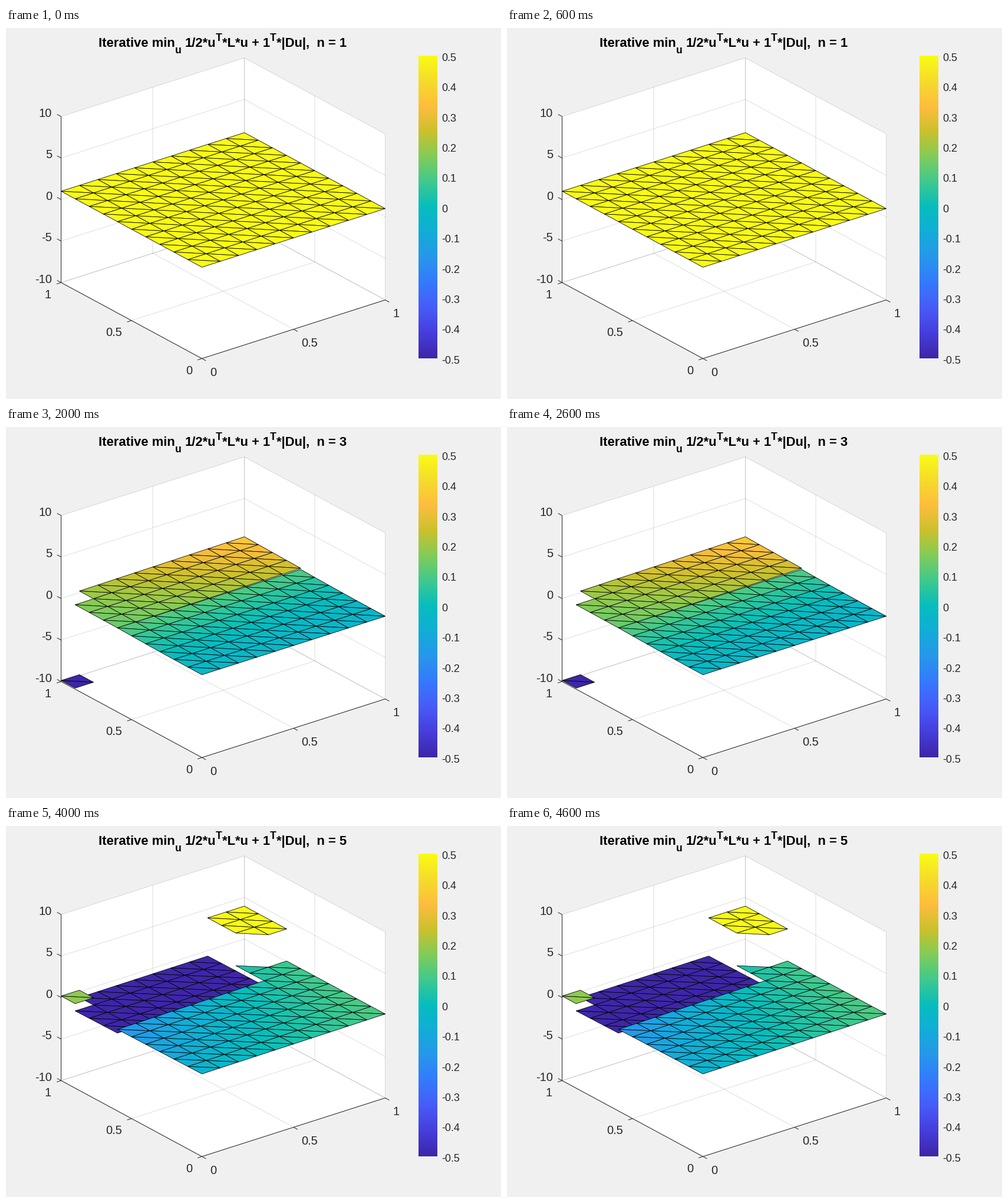
Animation, 840 px wide and 630 px high, one loop 5000 ms. Source, as a matplotlib script:

```python
import numpy as np
import matplotlib.pyplot as plt
from matplotlib.animation import FuncAnimation
from matplotlib.collections import PolyCollection
from matplotlib.colors import LinearSegmentedColormap
from matplotlib.textpath import TextPath

W, H, DPI = 840, 630, 100
PX = 72 / DPI
FONT = "Liberation Sans"
INK = "#262626"
N = 10
SPLIT = 0.6

plt.rcParams["font.family"] = FONT
fig = plt.figure(figsize=(W / DPI, H / DPI), dpi=DPI, facecolor="#f0f0f0")
ax = fig.add_axes([0, 0, 1, 1])
ax.axis("off")

# Evenly spaced key colours from violet through teal and orange to yellow
CMAP = LinearSegmentedColormap.from_list("sheet", (
    "#3e26a8 #463edd #475cf9 #347afd #2797eb #12add8 #06bdbd "
    "#3ec98f #81cc59 #cac12c #fdbd3d #f6db2b #f9fb15").split(), N=512)

# Orthographic projection: pixel vectors of the three box axes
ORIGIN = np.array([332.5, 561.3])
EX = np.array([311, -99.5])
EY = np.array([-239, -129])
EZ = np.array([0, -14.1])


def project(x, y, z=-10):
    x, y, z = (np.asarray(v, float)[..., None] for v in (x, y, z))
    return ORIGIN + x * EX + y * EY + (z + 10) * EZ


def line(a, b, alpha=1.0, zorder=3):
    ax.plot(*zip(a, b), color=INK, alpha=alpha, lw=PX, zorder=zorder,
            solid_capstyle="butt", snap=False)


def grid(a, b):
    line(project(*a), project(*b), alpha=0.15, zorder=2)


def label(x, y, s, size=20, ha="center"):
    """Text whose digits are centred vertically on y."""
    ax.text(x, y + 0.358 * size, s, size=size * PX, ha=ha, va="baseline",
            color=INK)


def draw_box():
    walls = [[(0, 0, -10), (1, 0, -10), (1, 1, -10), (0, 1, -10)],
             [(0, 1, -10), (1, 1, -10), (1, 1, 10), (0, 1, 10)],
             [(1, 1, -10), (1, 0, -10), (1, 0, 10), (1, 1, 10)]]
    for wall in walls:
        ax.fill(*project(*np.transpose(wall)).T, color="white", lw=0, zorder=1)

    line(project(0, 0), project(1, 0))
    line(project(0, 0), project(0, 1))
    line(project(0, 1), project(0, 1, 10))
    tick_x, tick_y = -EX / 42, -EY / 35

    for t in (0, 0.5, 1):
        grid((t, 0, -10), (t, 1, -10))
        grid((0, t, -10), (1, t, -10))
        grid((t, 1, -10), (t, 1, 10))
        grid((1, t, -10), (1, t, 10))
        p, q = project(t, 0), project(0, t)
        line(p, p + tick_y)
        line(q, q + tick_x)
        s = f"{t:g}"
        wide = 4 * (len(s) - 1)
        label(p[0] + 19 + wide, p[1] + 22.5, s)
        label(q[0] - 22 - wide, q[1] + 19.5, s)

    for z in range(-10, 11, 5):
        grid((0, 1, z), (1, 1, z))
        grid((1, 0, z), (1, 1, z))
        p = project(0, 1, z)
        line(p, p - tick_y)
        label(78, p[1] - 6.5, str(z), ha="right")


def draw_colorbar():
    left, right, top, bottom = 700, 732, 47, 561
    ax.imshow(np.linspace(1, 0, bottom - top)[:, None], cmap=CMAP,
              extent=(left, right, bottom, top), aspect="auto",
              interpolation="nearest", zorder=2)
    for k in range(11):
        y = top + (bottom - top) * k / 10
        label(right + 7.5, y + 2.3, f"{(5 - k) / 10:g}", size=18, ha="left")


def advance(s, size):
    """Pen advance of bold text, spaces included."""
    def end(t):
        path = TextPath((0, 0), t, size=size,
                        prop={"family": FONT, "weight": "bold"})
        return path.get_extents().x1
    return end(s + "|") - end("|")


def draw_title():
    """Lay out runs, with _ and ^ marking a lowered or raised run."""
    x, base, full = 157, 32, 22
    runs = ["Iterative min", "_u", " 1/2*u", "^T", "*L*u + 1", "^T", "*"]
    for run in runs:
        shift = {"_": 11, "^": -10}.get(run[0], 0)
        size = full * (0.8 if shift else 1)
        s = run[1:] if shift else run
        body = s.lstrip()
        pad = advance(" ", size) * (len(s) - len(body))
        last = ax.text(x + pad, base + shift, body, size=size * PX,
                       weight="bold", color="black", va="baseline")
        x += advance(s, size)
    return last


def build_mesh():
    tris = []
    for i in range(N):
        for j in range(N):
            a, b, c, d = (i, j), (i + 1, j), (i, j + 1), (i + 1, j + 1)
            tris += [(a, b, c), (b, d, c)]
    tris = np.array(tris) / N
    depth = tris.mean(1) @ [0.61, 0.79]
    return tris[np.argsort(-depth, kind="stable")]


TRIS = build_mesh()
X, Y = TRIS[..., 0], TRIS[..., 1]
CX, CY = X.mean(1)[:, None], Y.mean(1)[:, None]
FRONT_V, BACK_V = Y / SPLIT, (Y - SPLIT) / (1 - SPLIT)

# Regions that may break away from the sheet
BACK = CY > SPLIT
CORNER = (CX < 0.1) & (CY > 0.9)
NEAR = (CX + CY < 0.2) | (CX < 0.1) & (CX + CY < 0.3)
FAR = (CX > 0.8) & (CY > 0.7) & (CX + CY > 1.6)
SIDE = (CX > 0.8) & ~FAR


def ramp(v, near_l, near_r, far_l, far_r):
    """Bilinear height from the values at a region's four corners."""
    near = near_l + (near_r - near_l) * X
    far = far_l + (far_r - far_l) * X
    return near + (far - near) * v


def heights(n):
    """Corner heights of every triangle after iteration n."""
    if n == 1:
        return np.ones_like(X)
    if n == 2:
        return np.where(BACK, ramp(BACK_V, -1.14, -1.14, -1.22, -1.22),
                        ramp(FRONT_V, 0.92, 0.89, 0.7, 0.7))
    if n == 3:
        z = np.where(BACK, ramp(BACK_V, 0.13, 0.25, 0.18, 0.38),
                     ramp(FRONT_V**2, -0.03, -0.04, 0.13, 0.11))
        return np.where(CORNER, -9.87, z)
    if n == 4:
        z = np.where(BACK, ramp(BACK_V, 0.08, -0.02, 0.06, -0.06),
                     ramp(FRONT_V, 0.22, 0.46, 0.15, 0.28))
        return np.where(NEAR, -5.59, z)
    z = np.where(BACK & ~SIDE, ramp(BACK_V, -0.62, -0.55, -0.72, -0.63),
                 ramp(FRONT_V, -0.05, 0.11, -0.18, 0.09))
    return np.where(FAR, 3.95, np.where(CORNER, 0.18, z))


draw_box()
draw_colorbar()
counter = draw_title()
sheet = PolyCollection([], edgecolors="black", linewidths=0.8 * PX, zorder=5,
                       joinstyle="round")
ax.add_collection(sheet, autolim=False)
ax.set_xlim(0, W)
ax.set_ylim(H, 0)


def update(k):
    z = heights(k + 1)
    sheet.set_verts(project(X, Y, z))
    sheet.set_facecolor(CMAP(np.clip(z.mean(1) + 0.5, 0, 1)))
    counter.set_text(f"*|Du|,  n = {k + 1}")
    return sheet, counter


anim = FuncAnimation(fig, update, frames=5, interval=1000, repeat=True,
                     repeat_delay=0)
plt.show()
```
